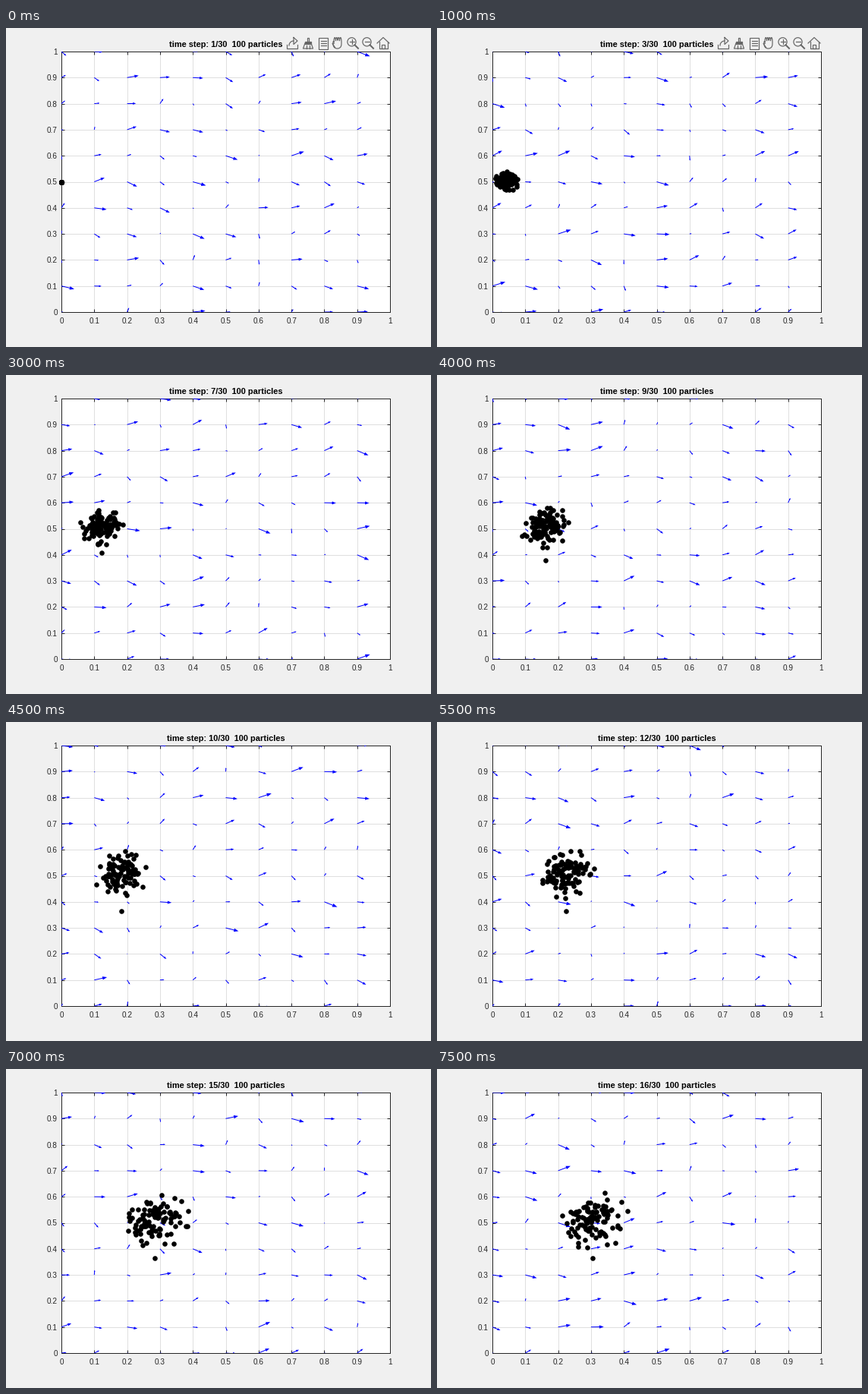
Write a matplotlib script that moves like this. It is 560 px wide and 420 px high and loops after 8000 ms.

```python
import numpy as np
import matplotlib.pyplot as plt
from matplotlib.animation import FuncAnimation
from matplotlib.collections import LineCollection, PolyCollection
from matplotlib.patches import Circle, Rectangle

plt.rcParams["font.family"] = "Liberation Sans"

W, H, DPI = 560, 420, 100
PX = 72 / DPI                      # one pixel in points
L, R, T, B = 73, 506, 31, 374
SIZE = np.array([R - L, B - T])
FRAMES, STEP, COUNT = 16, 0.04, 100
INK, GREY = "#262626", "#666666"

rng = np.random.default_rng(11)

# Random flow field, redrawn at every step
gx, gy = np.meshgrid(np.arange(10) / 10, np.arange(11) / 10)
base = np.stack([gx.ravel(), gy.ravel()], -1)
flow = STEP * (rng.random((FRAMES, len(base), 2)) - [0, 0.5])


def random_walks(n):
    """Particles that drift right while their cloud spreads with sqrt(time)."""
    k = np.arange(FRAMES)[:, None]
    kicks = STEP * (rng.random((FRAMES, n, 2)) - 0.5)
    kicks[0] = 0
    dev = np.cumsum(kicks, 0)
    dev -= dev.mean(1, keepdims=True)
    limit = 2.5 * STEP * np.sqrt(k / 12)
    radius = np.hypot(dev[..., 0], dev[..., 1]) + 1e-9
    dev *= np.minimum(1, limit / radius)[..., None]
    centre = np.stack([0.0203 * k, 0.5 + 0.01 * np.minimum(1, k / 4)], -1)
    return centre + dev


cloud = random_walks(COUNT)
# One straggler sinks below the cloud, then levels out
k = np.arange(FRAMES)
cloud[:, 0] = np.stack([0.0203 * k, 0.5 - 0.136 * np.minimum(1, k / 9)], -1)

fig = plt.figure(figsize=(W / DPI, H / DPI), dpi=DPI, facecolor="#f0f0f0")
ax = fig.add_axes([L / W, 1 - B / H, SIZE[0] / W, SIZE[1] / H])
ax.set(xlim=(0, 1), ylim=(0, 1))
ticks = np.arange(11) / 10
labels = [f"{t:g}" for t in ticks]
ax.set_xticks(ticks, labels)
ax.set_yticks(ticks, labels)
ax.tick_params(direction="in", top=True, right=True, length=4.3 * PX, width=PX,
               color=INK, labelcolor=INK, labelsize=10 * PX)
ax.tick_params(axis="x", pad=7.3 * PX)
ax.tick_params(axis="y", pad=5 * PX)
ax.grid(color="#dfdfdf", lw=PX)
ax.set_axisbelow(True)
for spine in ax.spines.values():
    spine.set(color=INK, lw=PX)

shafts = ax.add_collection(LineCollection([], colors="blue", lw=PX, zorder=3), autolim=False)
heads = ax.add_collection(
    PolyCollection([], facecolors="blue", edgecolors="none", zorder=3), autolim=False)
dots, = ax.plot([], [], "o", color="black", ms=6.6 * PX, mew=0, clip_on=False, zorder=4)

# Pixel-space layer for the title and the toolbar
top = fig.add_axes([0, 0, 1, 1])
top.set(xlim=(0, W), ylim=(H, 0))
top.axis("off")
title = top.text(290, 25, "", size=11 * PX, weight="bold", ha="center", va="baseline")

toolbar = []


def line(x, y, lw=1.2):
    toolbar.extend(top.plot(x, y, color=GREY, lw=lw * PX, solid_joinstyle="round"))


def box(x, y, w, h, fill=False):
    patch = Rectangle((x, y), w, h, fill=fill, fc=GREY, ec=GREY, lw=1.2 * PX)
    toolbar.append(top.add_patch(patch))


def share(x):
    a = np.linspace(np.pi, 1.5 * np.pi, 12)
    line([x - 7, x - 7, x + 7, x + 7], [22, 26.5, 26.5, 22])
    line(x + 2 + 6 * np.cos(a), 23 + 6 * np.sin(a))
    line([x + 2, x + 7, x + 2, x + 2], [12.5, 17, 21.5, 12.5])


def brush(x):
    box(x - 1.3, 12.5, 2.6, 5.5)
    box(x - 4, 18, 8, 2.5, fill=True)
    line([x - 4, x - 6.5, x + 6.5, x + 4], [20, 27, 27, 20])
    for dx in (-2, 2):
        line([x + dx, x + dx], [23, 27])


def data_tip(x):
    box(x - 6, 12.5, 12, 15)
    for y in (17, 20, 23):
        line([x - 3, x + 3.5], [y, y])


def hand(x):
    t = np.linspace(0, 1, 60)
    fingers = 18 - 5.5 * np.sqrt(abs(np.sin(4 * np.pi * t)))
    palm_x = x - 1 + 5.5 * np.cos(np.pi * t)
    palm_y = 18 + 9 * np.sqrt(np.sin(np.pi * t).clip(0))
    line(np.r_[x - 5 + 10 * t, palm_x + 0.5, x - 5], np.r_[fingers, palm_y, 18])
    line([x - 4.5, x - 7, x - 3.5], [20, 20.5, 25.5])


def magnifier(x, plus):
    ring = Circle((x, 18.3), 5.6, fill=False, ec=GREY, lw=1.2 * PX)
    toolbar.append(top.add_patch(ring))
    line([x + 4, x + 8.5], [22.3, 26.8], lw=2)
    line([x - 3, x + 3], [18.3, 18.3])
    if plus:
        line([x, x], [15.3, 21.3])


def home(x):
    line([x - 8, x, x + 8], [20, 12.5, 20])
    line([x - 5.5, x - 5.5, x + 5.5, x + 5.5], [18, 27.3, 27.3, 18])
    box(x - 2, 22, 4, 5.3)


share(377)
brush(398)
data_tip(418)
hand(437)
magnifier(455.5, True)
magnifier(475.5, False)
home(497)


def update(k):
    tip = base + flow[k]
    vec = flow[k] * SIZE
    side = np.stack([-vec[:, 1], vec[:, 0]], -1) * 0.13 / SIZE
    back = tip - 0.35 * flow[k]
    shafts.set_segments(np.stack([base, tip - 0.2 * flow[k]], 1))
    heads.set_verts(np.stack([tip, back + side, back - side], 1))
    dots.set_data(cloud[k, :, 0], cloud[k, :, 1])
    title.set_text(f"time step: {k + 1}/30  {COUNT} particles")
    for part in toolbar:
        part.set_visible(k < 3)
    return [shafts, heads, dots, title, *toolbar]


anim = FuncAnimation(fig, update, frames=FRAMES, interval=500, repeat=True,
                     repeat_delay=0, blit=False)
plt.show()
```
